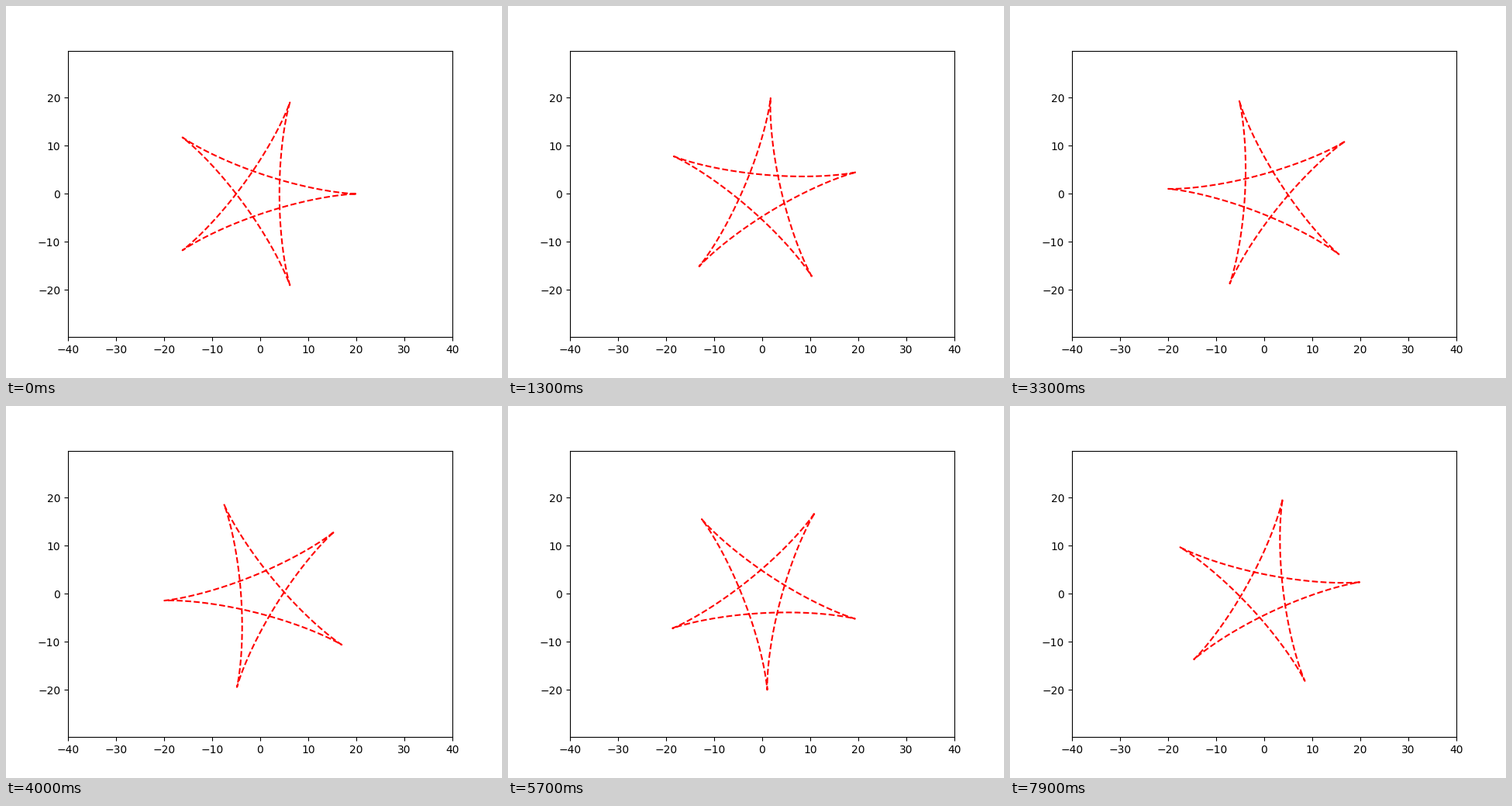
Animation of 640 by 480 pixels, one loop 8000 ms. Source, as a matplotlib script:

```python
import numpy as np
import matplotlib.pyplot as plt
from matplotlib.animation import FuncAnimation

R, r = 20, 8          # fixed and rolling circle radii
FRAMES, INTERVAL = 80, 100

t = np.linspace(0, 4 * np.pi, 1001)
x = (R - r) * np.cos(t) + r * np.cos((R - r) / r * t)
y = (R - r) * np.sin(t) - r * np.sin((R - r) / r * t)

fig, ax = plt.subplots(figsize=(6.4, 4.8), dpi=100)
half_width = 40
half_height = half_width * (0.77 * 480) / (0.775 * 640)  # equal scale on both axes
ax.set_xlim(-half_width, half_width)
ax.set_ylim(-half_height, half_height)
star, = ax.plot(x, y, "r--", lw=1.5)


def update(i):
    """Turn the star by one degree per frame."""
    a = np.radians(i)
    star.set_data(x * np.cos(a) - y * np.sin(a), x * np.sin(a) + y * np.cos(a))
    return star,


anim = FuncAnimation(fig, update, frames=FRAMES, interval=INTERVAL,
                     repeat=True, repeat_delay=0)
plt.show()
```
